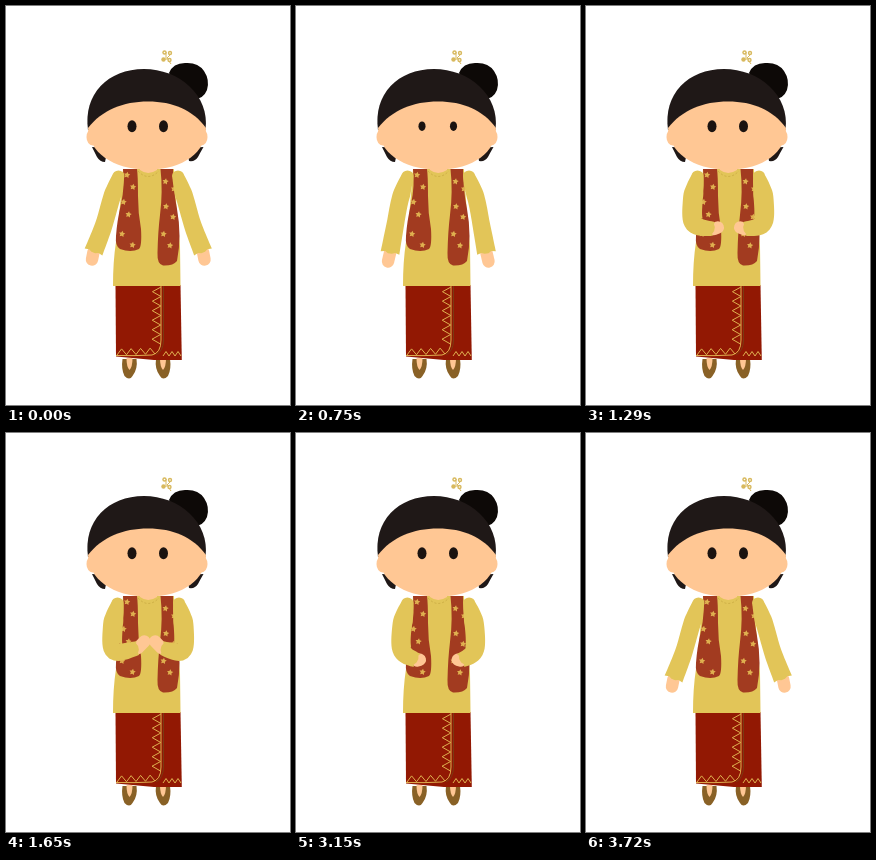
Write an HTML page with a canvas that moves like this. It is 284 by 399 pixels and loops after 3750 ms.

```html
<!DOCTYPE html>
<html lang="en">
<head>
<meta charset="utf-8">
<title>Greeting</title>
<style>
html, body { margin: 0; width: 100%; height: 100%; overflow: hidden; background: #fff; }
canvas { display: block; width: 284px; height: 399px; }
</style>
</head>
<body>
<canvas id="stage" width="284" height="399"></canvas>
<script>
const ctx = document.getElementById('stage').getContext('2d');
const LOOP = 3750, STEP = 30;
const C = {
  skin: '#ffc794', cloth: '#e2c558', vest: '#a23b20', skirt: '#921803', gold: '#dfb04f',
  hair: '#1f1817', bun: '#0d0907', shoe: '#896126', eye: '#1b1310', pin: '#d8b95e'
};

// Arm pose: shoulder, upper arm, elbow, wrist, hand tip,
// shift of the right hand, half widths of the sleeve at the middle and the cuff
const POSE = {
  rest:  [112.5, 170, 105, 194, 97.5, 220, 87.5, 246, 86, 253.5, 0, 8.7, 9.5],
  lower: [111.5, 170, 104, 194, 99, 220, 94, 247, 92, 255.5, 0, 8.7, 9.5],
  side:  [111, 170, 103.5, 192, 100.5, 219, 100, 241, 100, 242.5, 0, 9, 8.5],
  bent:  [111.5, 170, 106.8, 194, 108.5, 218, 128, 223, 131.8, 221.5, 1.5, 9.9, 6.8],
  joined: [111.5, 170, 106.8, 194, 109, 218, 132, 215, 138.3, 208.5, 3, 9.9, 6.8]
};

function timeline(end) {
  return [
    [450, POSE.rest], [750, POSE.lower], [930, POSE.side], [1290, POSE.bent],
    [end, POSE.joined], [2790, POSE.joined], [3050, POSE.bent],
    [3450, POSE.side], [3720, POSE.rest]
  ];
}
const LEFT = timeline(1530), RIGHT = timeline(1650);

function poseAt(keys, t) {
  if (t <= keys[0][0]) return keys[0][1];
  for (let i = 1; i < keys.length; i++) {
    const [t0, a] = keys[i - 1], [t1, b] = keys[i];
    if (t <= t1) return a.map((v, j) => v + (b[j] - v) * (t - t0) / (t1 - t0));
  }
  return keys[keys.length - 1][1];
}

function fillPath(color, d) {
  ctx.fillStyle = color;
  ctx.fill(new Path2D(d));
}

function strokePath(color, width, d) {
  ctx.strokeStyle = color;
  ctx.lineWidth = width;
  ctx.stroke(new Path2D(d));
}

function oval(color, x, y, rx, ry) {
  ctx.fillStyle = color;
  ctx.beginPath();
  ctx.ellipse(x, y, rx, ry, 0, 0, Math.PI * 2);
  ctx.fill();
}

function star(x, y) {
  ctx.fillStyle = C.gold;
  ctx.beginPath();
  for (let i = 0; i < 10; i++) {
    const r = i % 2 ? 1.7 : 3.3, a = i * Math.PI / 5 - 1.4;
    ctx.lineTo(x + r * Math.cos(a), y + r * Math.sin(a));
  }
  ctx.fill();
}

function zigzag(x0, y0, x1, y1, count, height) {
  const len = Math.hypot(x1 - x0, y1 - y0);
  const nx = (y1 - y0) / len * height, ny = (x0 - x1) / len * height;
  ctx.strokeStyle = C.gold;
  ctx.lineWidth = 1;
  ctx.beginPath();
  for (let i = 0; i <= count * 2; i++) {
    const u = i / (count * 2), k = i % 2;
    ctx.lineTo(x0 + (x1 - x0) * u + nx * k, y0 + (y1 - y0) * u + ny * k);
  }
  ctx.stroke();
}

function skirt() {
  for (const x of [123.5, 157]) {
    const s = x < 140 ? 1 : -1;
    fillPath(C.shoe, `M${x - 7} 353 H${x + 7} Q${x + 8.5} 363 ${x + 4 - s} 370 Q${x} 375 ${x - 4 - s} 370 Q${x - 8.5} 363 ${x - 7} 353Z`);
    fillPath(C.skin, `M${x - 3} 352 H${x + 3} Q${x + 3} 361 ${x} 364 Q${x - 3} 361 ${x - 3} 352Z`);
  }
  fillPath(C.skirt, 'M109.5 279 H174.5 L175.8 354 H148 L110 350.5Z');
  strokePath('#7a3a14', 1, 'M157.5 280 V335 Q157 345 150 349');
  strokePath(C.gold, 1, 'M155 280 V334 Q155 347 146 349 Q128 350 110 349.5');
  zigzag(155, 281, 154.5, 338, 6, -8.5);
  zigzag(111, 349, 149, 348, 4, 6);
  zigzag(157, 350, 175, 350, 3, 4.5);
}

function torso() {
  fillPath(C.cloth, 'M117 163 H168 Q170 200 174 240 L174.5 280 H107 Q107 255 110 236 Q114 205 117 163Z');
  fillPath(C.vest, 'M117 163 H131 Q132 170 132 190 Q132 207 135 223 Q136 240 133 243 Q125 247 114 243 Q109 240 110 230 Q111 215 115 198 Q119 180 117 163Z');
  fillPath(C.vest, 'M154.5 163 H167 Q167 183 171 203 Q176 230 171 255 Q167 260 157 259.5 Q151 258 151.5 247 Q152 225 154 209 Q157 185 154.5 163Z');
  const stars = [
    121, 169, 127, 181, 117.5, 196, 122.5, 208.5, 116, 228, 126.5, 239,
    159.5, 175.5, 168, 183, 160, 200.5, 167, 211, 157.5, 228, 164, 239.5
  ];
  for (let i = 0; i < stars.length; i += 2) star(stars[i], stars[i + 1]);
  fillPath(C.skin, 'M134 158 H151 V164 Q142 170 134 164Z');
  ctx.setLineDash([2, 2]);
  strokePath('#cdae45', 1, 'M132 165 Q142 176 153 165');
  ctx.setLineDash([]);
}

function spline(p, n) {
  const out = [], last = p.length - 1;
  for (let i = 0; i < last; i++) {
    const a = p[Math.max(0, i - 1)], b = p[i], c = p[i + 1], d = p[Math.min(last, i + 2)];
    for (let k = i ? 1 : 0; k <= n; k++) {
      const u = k / n;
      out.push([0, 1].map(j => b[j] + u / 2 * (c[j] - a[j] +
        u * (2 * a[j] - 5 * b[j] + 4 * c[j] - d[j] + u * (3 * (b[j] - c[j]) + d[j] - a[j])))));
    }
  }
  return out;
}

function arm(pose, right) {
  const pts = [], [shift, middle, end] = pose.slice(10);
  for (let i = 0; i < 5; i++) {
    const x = pose[i * 2];
    pts.push([right ? 284.5 - x + (i > 2 ? shift : 0) : x, pose[i * 2 + 1]]);
  }
  const [wrist, tip] = [pts[3], pts[4]];
  ctx.lineCap = 'round';
  strokePath(C.skin, 12.4, `M${wrist} L${tip}`);
  ctx.lineCap = 'butt';

  const line = spline(pts.slice(0, 4), 10), n = line.length - 1;
  const sides = [[], []];
  let dir;
  line.forEach((p, i) => {
    const a = line[Math.max(0, i - 1)], b = line[Math.min(n, i + 1)];
    const len = Math.hypot(b[0] - a[0], b[1] - a[1]) || 1;
    dir = [(b[0] - a[0]) / len, (b[1] - a[1]) / len];
    const u = i / n;
    const w = 5.8 + (middle - 5.8) * Math.min(1, u * 4) + (end - middle) * Math.max(0, u - 0.6) / 0.4;
    sides[0].push([p[0] - dir[1] * w, p[1] + dir[0] * w]);
    sides[1].unshift([p[0] + dir[1] * w, p[1] - dir[0] * w]);
  });
  // scalloped cuff
  const cuff = [5, 2, -2, -5].map((w, i) => {
    const k = i % 3 ? 0.5 : -1;
    return [wrist[0] - dir[1] * w + dir[0] * k, wrist[1] + dir[0] * w + dir[1] * k];
  });
  fillPath(C.cloth, 'M' + [...sides[0], ...cuff, ...sides[1]].join('L') + 'Z');
  oval(C.cloth, pts[0][0], pts[0][1], 6, 5.5);
}

function head(t) {
  fillPath(C.bun, 'M163 67 Q167 57 179 57 Q192 56 198 65 Q204 74 201 84 Q197 94 186 93 L172 84Z');
  fillPath(C.hair, 'M82 124 C77 88 102 63 138 63 C173 63 204 89 199.5 124Z');
  fillPath(C.hair, 'M86 141 Q89 147 91 151 Q94 156 99 156 L102 142Z M197.5 141 Q194 147 192 151 Q189 156 183 155 L181 142Z');
  oval(C.skin, 86.5, 131, 6, 8.5);
  oval(C.skin, 195.5, 131, 6, 8.5);
  fillPath(C.skin, 'M82 122 C96 104 117 95.5 142 95.5 C167 95.5 187 104 200 122 C200 146 178 163.5 142 163.5 C106 163.5 83 146 82 122Z');

  const blink = (t >= 750 && t < 840) || (t >= 2790 && t < 2880);
  const s = blink ? 0.79 : 1;
  for (const x of [126, 157.5]) oval(C.eye, x, 120.2, 4.5 * s, 6 * s);

  // hairpin
  for (const [x, y] of [[158.5, 46.5], [164, 47], [157.5, 53.5], [163.5, 54]]) oval(C.pin, x, y, 2.2, 2.2);
  strokePath(C.pin, 1, 'M160 46 L160 54 M164 49 L161 52 L165 58');
  for (const [x, y] of [[158.5, 46.5], [164, 47], [163.5, 54]]) oval('#fff', x, y, 0.8, 0.8);
}

function draw(now) {
  const t = Math.floor((now % LOOP) / STEP) * STEP;
  ctx.fillStyle = '#fff';
  ctx.fillRect(0, 0, 284, 399);
  skirt();
  torso();
  arm(poseAt(LEFT, t), false);
  arm(poseAt(RIGHT, t), true);
  head(t);
}

const start = performance.now();
function tick() {
  draw(performance.now() - start);
  requestAnimationFrame(tick);
}
tick();
</script>
</body>
</html>
```
